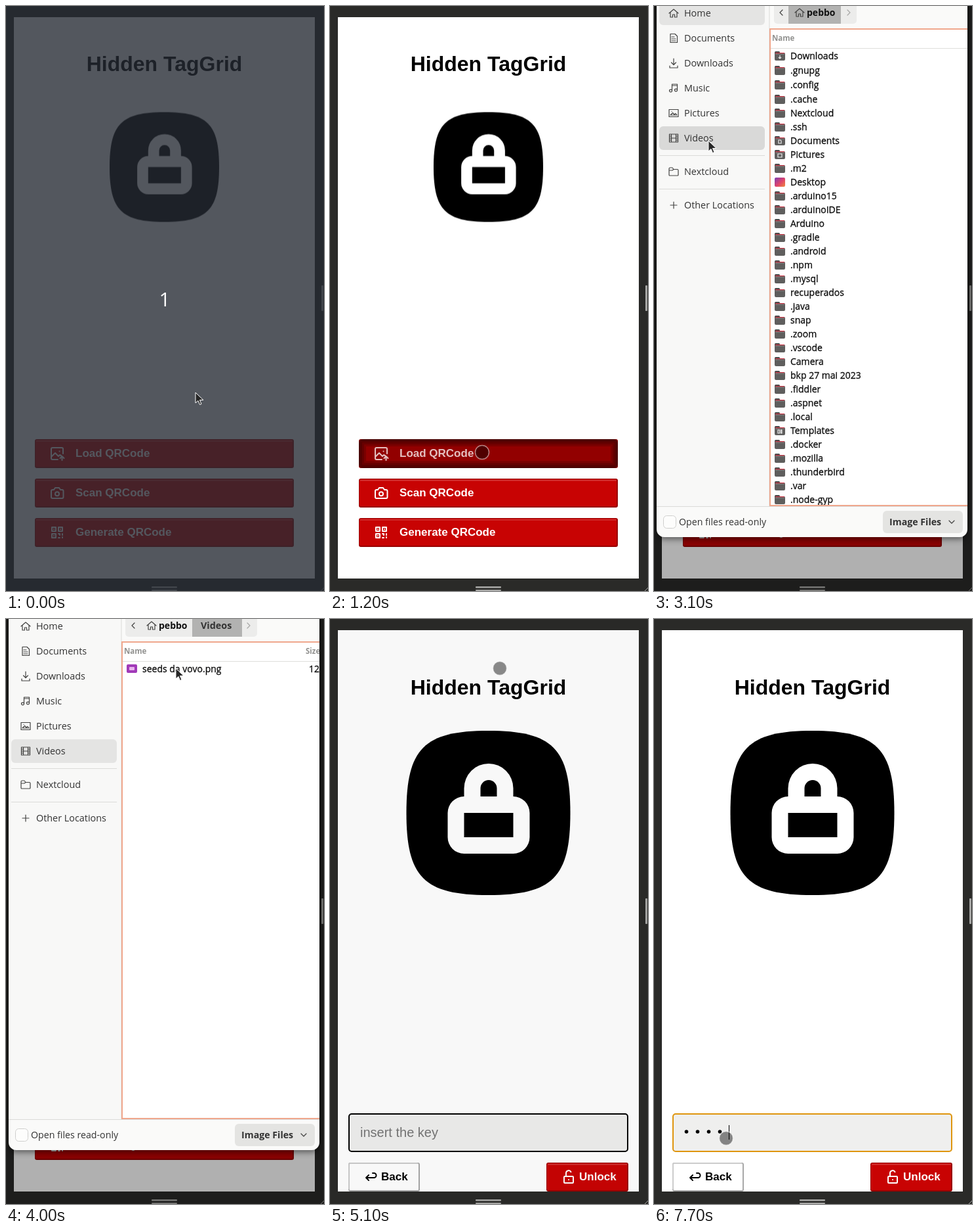
Animation, 485 px wide and 890 px high, one loop 8 s. Source, as an HTML page:

```html
<!DOCTYPE html>
<html lang="en">
<head>
<meta charset="utf-8">
<title>Hidden TagGrid</title>
<style>
html, body { margin: 0; width: 485px; height: 890px; overflow: hidden; background: #2a2a28; }
svg { display: block; }
text { white-space: pre; }
.page { font: bold 17px "Liberation Sans", Arial, sans-serif; }
.title { font-size: 32px; text-anchor: middle; }
.ui { font: 14.4px "Open Sans", "Noto Sans", sans-serif; fill: #333; }
.list { font-size: 14px; fill: #0c0c0c; }
.list text { stroke: #0c0c0c; stroke-width: .3px; }
.b { font-weight: bold; }
.mid { text-anchor: middle; }
.ico { fill: none; stroke: currentColor; stroke-width: 2; stroke-linejoin: round; stroke-linecap: round; }
.thin { stroke: #434342; stroke-width: 1.2; }
.anim, [data-on] { animation: 8s step-end -8ms infinite; }
#veil { animation-name: veil; }
#scrim { animation-name: scrim; }
#dialog { animation-name: dialog; transform-origin: 241px 376px; }
#pointer { animation-name: pointer; }

@keyframes veil {
  0% { opacity: 1; animation-timing-function: steps(3); }
  3.75%, 100% { opacity: 0; }
}
@keyframes scrim {
  0% { opacity: 0; }
  16.25% { opacity: .06; animation-timing-function: steps(4); }
  21.25% { opacity: .31; }
  61.25% { opacity: .27; }
  62.5% { opacity: .14; }
  63.75% { opacity: .027; }
  65%, 100% { opacity: 0; }
}
@keyframes dialog {
  0% { transform: scaleY(0); }
  16.25% { transform: scaleY(.5); }
  17.5% { transform: scaleY(.9); }
  18.75% { transform: scaleY(1); }
  61.25% { transform: translateY(1.5px) scale(1.003, .436); }
  62.5%, 100% { transform: scaleY(0); }
}
@keyframes pointer {
  0% { transform: translate(289px, 588px); animation-timing-function: steps(9); }
  11.25% { transform: translate(232px, 679px); }
  18.75% { transform: translate(232px, 679px); animation-timing-function: steps(5); }
  25% { transform: translate(268px, 328px); animation-timing-function: steps(4); }
  30% { transform: translate(160px, 210px); animation-timing-function: steps(3); }
  33.75% { transform: translate(62px, 122px); animation-timing-function: steps(2); }
  36.25% { transform: translate(26px, 172px); animation-timing-function: steps(2); }
  38.75% { transform: translate(83px, 205px); }
  40% { transform: translate(83px, 205px); animation-timing-function: steps(8); }
  50% { transform: translate(259px, 75px); }
  67.5% { transform: translate(259px, 75px); animation-timing-function: steps(2); }
  70% { transform: translate(312px, 150px); animation-timing-function: steps(2); }
  72.5% { transform: translate(351px, 330px); animation-timing-function: steps(2); }
  75% { transform: translate(290px, 590px); animation-timing-function: steps(3); }
  78.75% { transform: translate(109px, 805px); }
  80% { transform: translate(116px, 798px); }
  81.25%, 100% { transform: translate(110px, 790px); }
}
</style>
</head>
<body>
<svg id="stage" width="485" height="890" viewBox="0 0 485 890"></svg>
<script>
const rect = (x, y, w, h, fill, r = 0, more = '') =>
  `<rect x="${x}" y="${y}" width="${w}" height="${h}" rx="${r}" fill="${fill}" ${more}/>`;
const text = (x, y, s, cls = '', more = '') => `<text x="${x}" y="${y}" class="${cls}" ${more}>${s}</text>`;
const icon = (x, y, d, cls = '') => `<path class="ico ${cls}" transform="translate(${x} ${y})" d="${d}"/>`;
const during = (a, b, s) => `<g data-on="${a} ${b}">${s}</g>`;

const ICONS = {
  load: 'M11 19H3a2 2 0 0 1-2-2V3a2 2 0 0 1 2-2H17a2 2 0 0 1 2 2V10M1 15L7 9L12 14L14 12L16 13M17.5 20V14M14.5 17L17.5 14L20.5 17M13.5 6.5h.1',
  scan: 'M7 2H13L15 5H17.5a2 2 0 0 1 2 2V16a2 2 0 0 1-2 2H3a2 2 0 0 1-2-2V7a2 2 0 0 1 2-2H5ZM13 11.3a3 3 0 1 1-6 0a3 3 0 1 1 6 0',
  make: 'M2 2H8V8H2ZM12 2H18V8H12ZM2 12H8V18H2ZM5 5h.1M15 5h.1M5 15h.1M12 12H14V14M18 12V14M12 18H14M18 17V18',
  home: 'M1 8L8 2L15 8M3 7V14H6.5V10H9.5V14H13V7',
  docs: 'M3 1.5H10L13.5 5V14.5H3ZM5 6H9M5 9H11M5 12H11',
  down: 'M8 1V10M4.5 7L8 10.5L11.5 7M2 12V15H14V12',
  music: 'M5.5 12V2H13.5V11M5.5 12a2 1.8 0 1 1-4 0a2 1.8 0 1 1 4 0M13.5 11a2 1.8 0 1 1-4 0a2 1.8 0 1 1 4 0M5.5 4H13.5',
  pics: 'M1 2.5H15V13.5H1ZM3 11L6.5 7.5L9 10L11 8.5L13 11ZM5 5.5h.2',
  video: 'M1.5 2H14.5V14H1.5ZM4.5 2V14M11.5 2V14M4.5 8H11.5M1.5 5H4.5M1.5 8H4.5M1.5 11H4.5M11.5 5H14.5M11.5 8H14.5M11.5 11H14.5',
  folder: 'M1 13V3.5a1.5 1.5 0 0 1 1.5-1.5H6L8 4.5H13.5a1.5 1.5 0 0 1 1.5 1.5V13a1 1 0 0 1-1 1H2a1 1 0 0 1-1-1ZM1 6H6L8 4.5',
  plus: 'M8 3V13M3 8H13'
};

const lock = (x, y, k) => `<g transform="translate(${x} ${y}) scale(${k})">
  <path d="M0 125C0 27 27 0 125 0S250 27 250 125 223 250 125 250 0 223 0 125"/>
  <path fill="#fff" fill-rule="evenodd" d="M88 100V87.5a37.5 37.5 0 0 1 75 0V100a25 25 0 0 1 25 25V162a25 25 0 0 1-25 25H88a25 25 0 0 1-25-25V125a25 25 0 0 1 25-25ZM113 100H138V87.5a12.5 12.5 0 0 0-25 0ZM88 125V162H163V125Z"/></g>`;

const redBox = (x, y, w, fill = '#c80303') =>
  rect(x, y, w, 44, '#900', 3) + rect(x + 1, y + 1, w - 3, 41, fill, 2) +
  rect(x + 2, y + 2, w - 4, 1.5, '#fff', 0, 'opacity=".2"');

const label = (y, s, name) =>
  `<g fill="#fff" color="#fff">${icon(68, y + 12, ICONS[name])}${text(106, y + 27, s)}</g>`;
const wide = (y, s, name, fill) => redBox(44, y, 395, fill) + label(y, s, name);

const pressed = rect(44, 659, 395, 44, '#920000', 3) +
  [2, 5, 8, 11].map(w => rect(44 + w / 2, 659 + w / 2, 395 - w, 44 - w, 'none', 3,
    `stroke="#000" stroke-opacity=".16" stroke-width="${w}"`)).join('') +
  `<g opacity=".75">${label(659, 'Load QRCode', 'load')}</g>`;

const menu = text(241.5, 99, 'Hidden TagGrid', 'title') + lock(158, 161.5, .668) +
  during(0, 1200, wide(659, 'Load QRCode', 'load')) +
  during(1200, 1300, pressed) +
  during(1300, 5000, wide(659, 'Load QRCode', 'load', '#a70000')) +
  wide(719, 'Scan QRCode', 'scan') + wide(779, 'Generate QRCode', 'make');

const field = stroke => rect(29, 753, 425, 57, '#efefee', 4, `stroke="${stroke}" stroke-width="2"`);
const caret = x => rect(x, 770, 1, 22, '#000');
const typed = [7300, 7500, 7600, 7700];
const unlock = text(241.5, 115, 'Hidden TagGrid', 'title') + lock(116.5, 170, 1) +
  during(0, 6700, field('#000')) + during(6700, 8000, field('#df950e')) +
  during(0, 7300, text(46, 788, 'insert the key', '', 'fill="#757575" style="font-size:20px;font-weight:400"')) +
  during(6700, 7100, caret(46)) +
  typed.map((t, i) => during(t, 8000, `<circle cx="${49.5 + 17 * i}" cy="780" r="2.8"/>`) +
    during(t, typed[i + 1] || 8000, caret(63 + 17 * i))).join('') +
  rect(28, 827, 109, 44, '#a8a8a8', 3) + rect(28, 827, 107, 42, '#ccc', 3) + rect(30, 829, 105, 40, '#fff', 1) +
  icon(54, 842, 'M11 1H13a3.5 3.5 0 0 1 0 7H1M5 4L1 8L5 12') + text(78, 854, 'Back') +
  redBox(330, 827, 125) +
  `<g fill="#fff" color="#fff">${icon(356, 838, 'M2 10H14a1 1 0 0 1 1 1V19a1 1 0 0 1-1 1H2a1 1 0 0 1-1-1V11a1 1 0 0 1 1-1ZM4 10V5a4 4 0 0 1 7.5-1.8M8 15h.1')}${text(380, 854, 'Unlock')}</g>`;

// File chooser
const places = [['Home', 11, 'home'], ['Documents', 49, 'docs'], ['Downloads', 87, 'down'], ['Music', 125, 'music'],
  ['Pictures', 163, 'pics'], ['Videos', 201, 'video'], ['Nextcloud', 252, 'folder'], ['Other Locations', 303, 'plus']];
const files = ('Downloads,.gnupg,.config,.cache,Nextcloud,.ssh,Documents,Pictures,.m2,Desktop,.arduino15,.arduinoIDE,' +
  'Arduino,.gradle,.android,.npm,.mysql,recuperados,.java,snap,.zoom,.vscode,Camera,bkp 27 mai 2023,.fiddler,' +
  '.aspnet,.local,Templates,.docker,.mozilla,.thunderbird,.var,.node-gyp').split(',');
const emblems = { Downloads: 'M8 6V11M6 9L8 11L10 9', Documents: 'M6 6H9L10 7V11H6Z', Pictures: 'M5 6H11V11H5ZM8 8.5h.1',
  Templates: 'M5 6H7.5V11H5ZM9.5 6H11V11H9.5Z' };

const folder = (y, name) => name === 'Desktop' ? rect(184, y - 7, 16, 14, 'url(#dusk)', 2) :
  rect(184, y - 7, 8, 5, '#4a4948', 1.5) + rect(184, y - 5, 16, 12, '#5f5e5d', 2) +
  rect(185, y - 5, 14, 1.2, '#cf3d4e') + rect(185, y - 3, 14, .8, '#82807f') +
  (emblems[name] ? `<path transform="translate(184 ${y - 7})" d="${emblems[name]}" fill="none" stroke="#eee" stroke-width="1.2"/>` : '');
const fileRow = (name, i) => {
  const y = i < 4 ? 76 + 22 * i : 142 + 21 * (i - 3);
  return folder(y, name) + text(208, y + 5, name);
};
const place = ([s, y, name]) => icon(22, y - 8, ICONS[name], 'thin') + text(46, y + 5, s);
const chevron = (x, y, d, op = 1) => `<g opacity="${op}">${icon(x, y, d, 'thin')}</g>`;
const LEFT = 'M4 0L0 4L4 8', RIGHT = 'M0 0L4 4L0 8';
const owner = icon(214, 2, ICONS.home, 'thin') + text(233, 15, 'pebbo', 'b', 'fill="#111" style="font-size:14px"');

const homeView = rect(8, -7, 161, 36, '#e4e4e3', 6) +
  rect(183, -8, 126, 35, '#ececeb', 5) + rect(205, -8, 80, 35, '#b2b2b1') + owner +
  chevron(192, 6, LEFT) + chevron(295, 6, RIGHT, .4);
const videoView = rect(8, 183, 161, 36, '#e4e4e3', 6) +
  rect(182, -8, 201, 35, '#ececeb', 5) + rect(284, -8, 76, 35, '#b2b2b1') + owner +
  text(297, 15, 'Videos', 'b') + chevron(192, 6, LEFT) + chevron(368, 6, RIGHT, .4);
const videoList = during(4400, 8000, rect(178, 65, 300, 22, '#e4e4e3')) +
  rect(184, 69, 16, 13, '#a13ab8', 2) + rect(188, 73, 8, 5, '#e9b4ee', 1) +
  text(208, 81, 'seeds da vovo.png') + text(462, 81, '12 kB');

const dialog = rect(4, -56, 474, 864, '#fafaf9', 12, 'filter="url(#drop)"') +
  `<g class="ui" clip-path="url(#frame)">
  ${rect(4, -15, 172, 776, '#f8f8f7')}${rect(4, -15.5, 474, 1, '#dcdcda')}
  ${rect(10, -54, 82, 33, '#e2e2e1', 6)}${text(51, -33, 'Cancel', 'b mid')}
  ${text(241, -33, 'Open File', 'b mid')}${icon(358, -46, 'M12 6.5a5.5 5.5 0 1 1-11 0a5.5 5.5 0 1 1 11 0M10.5 10.5L15 15', 'thin')}
  ${rect(390, -54, 81, 33, '#bd4317', 6)}${text(430, -33, 'Select', 'b mid', 'fill="#fff"')}
  ${rect(175.5, -15, 1, 776, '#dadad8')}
  ${during(0, 3300, homeView)}${during(3300, 8000, videoView)}
  ${during(3000, 3500, rect(8, 183, 161, 36, '#d9d9d8', 6))}
  ${places.map(place).join('')}
  ${rect(8, 227, 161, 1, '#dbdbd9')}${rect(8, 278, 161, 1, '#dbdbd9')}
  ${rect(177, 35, 310, 725, '#fff', 0, 'stroke="#f0a78d" stroke-width="2"')}
  ${rect(178, 64, 300, 1, '#dededc')}
  ${text(180, 53, 'Name', 'b', 'fill="#929290" style="font-size:11.5px"')}
  <g class="list"><g clip-path="url(#pane)">${during(0, 3300, files.map(fileRow).join(''))}</g>${during(3300, 8000, videoList)}</g>
  ${during(3300, 8000, text(457, 53, 'Size', 'b', 'fill="#929290" style="font-size:11.5px"'))}
  ${rect(4, 761, 474, 1, '#dadad8')}
  ${rect(14.5, 775.5, 19, 19, '#fdfdfc', 5, 'stroke="#cfcfcd"')}${text(38, 790, 'Open files read-only', '', 'style="font-size:14.2px"')}
  ${rect(349, 768, 122, 34, '#e4e4e2', 6)}${text(359, 790, 'Image Files', 'b', 'style="font-size:14.2px"')}
  ${chevron(450, 783, 'M0 0L4 4L8 0')}</g>`;

const arrow = '<path d="M0 0V16L4 12.5L6.5 18.5L9 17.5L6.5 11.5H12Z" fill="#272727" stroke="#fff" stroke-linejoin="round"/>';
const touch = '<circle r="10.5" fill="#000" fill-opacity=".45" stroke="#fff" stroke-opacity=".5" stroke-width="1.5"/>';

document.getElementById('stage').innerHTML = `<defs>
  <clipPath id="frame">${rect(4, -56, 474, 864, '#000', 12)}</clipPath>
  <clipPath id="pane">${rect(178, 65, 300, 694, '#000')}</clipPath>
  <linearGradient id="dusk" x2="1" y2="1"><stop stop-color="#7b3fb5"/><stop offset=".55" stop-color="#e0436b"/><stop offset="1" stop-color="#f08a3c"/></linearGradient>
  <filter id="drop" x="-5%" y="-5%" width="110%" height="110%"><feDropShadow dx="0" dy="3" stdDeviation="5" flood-opacity=".5"/></filter></defs>
  ${rect(0, 0, 485, 890, '#2a2a28')}${rect(12, 17, 459, 854, '#fff')}
  ${rect(481, 425, 3, 39, '#a9a9a7', 1)}${rect(222, 883, 39, 2.5, '#a9a9a7', 1)}${rect(222, 888, 39, 2, '#a9a9a7', 1)}
  <path d="M480 890L485 885" stroke="#a9a9a7"/>
  <g class="page">${during(0, 5000, menu)}${during(5000, 8000, unlock)}</g>
  <g id="scrim" class="anim">${rect(0, 0, 485, 890, '#000')}</g>
  <g id="dialog" class="anim">${dialog}</g>
  <g id="veil" class="anim">${rect(0, 0, 485, 890, '#262b33', 0, 'opacity=".79"')}${text(242, 457, '1', 'ui mid', 'style="font-size:30px;fill:#fff"')}</g>
  <g id="pointer" class="anim">${during(0, 200, arrow)}${during(200, 1400, touch)}${during(1400, 4900, arrow)}${during(4900, 8000, touch)}</g>`;

// One on/off keyframe rule per timed part
const sheet = document.createElement('style');
document.querySelectorAll('[data-on]').forEach((el, i) => {
  const [from, to] = el.dataset.on.split(' ').map(ms => ms / 80);
  sheet.textContent += `@keyframes on${i}{${from ? '0%{opacity:0}' : ''}${from}%{opacity:1}${to}%{opacity:0}}\n`;
  el.style.animationName = 'on' + i;
});
document.head.append(sheet);
</script>
</body>
</html>
```
